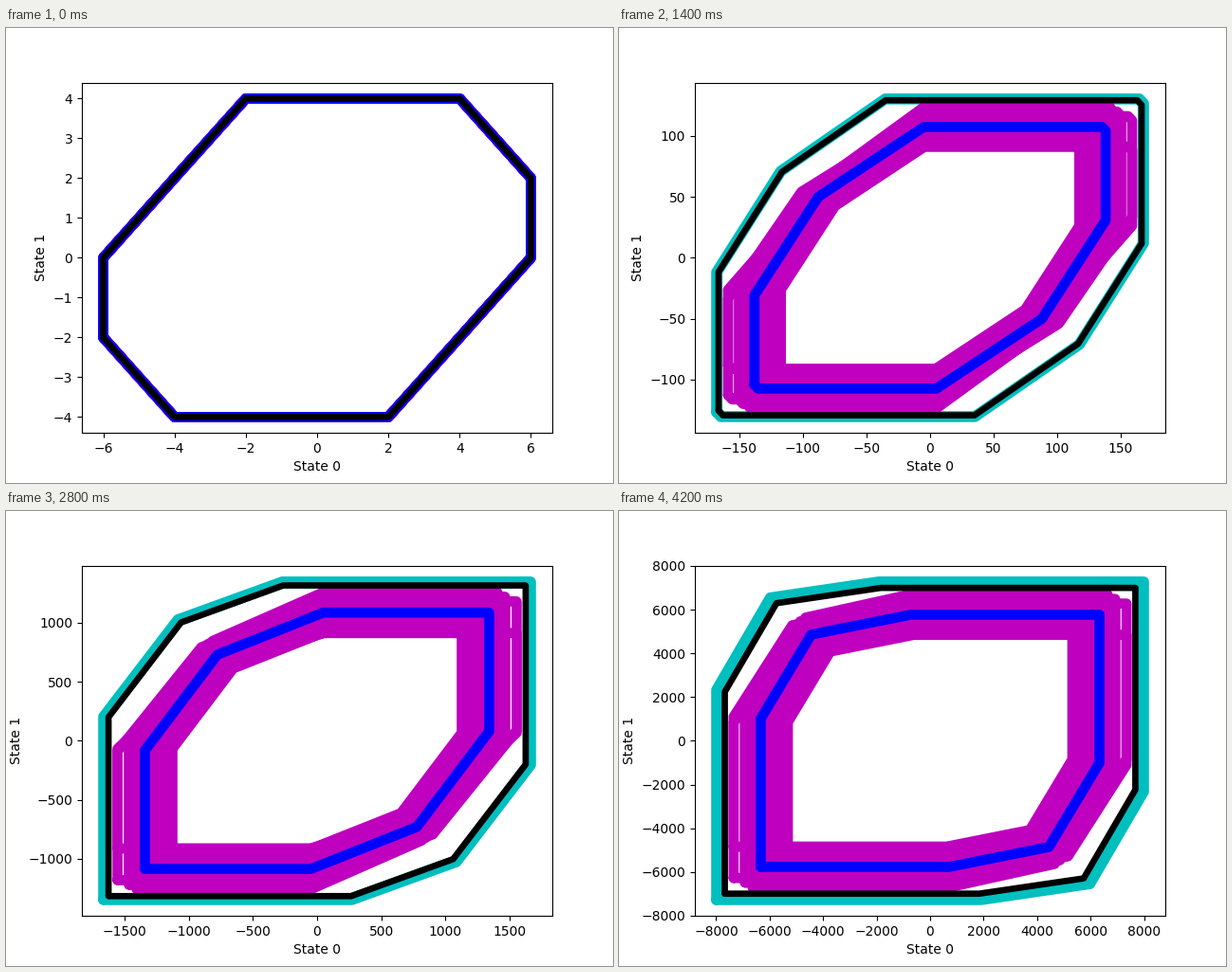
These frames come from a looping animation (640 px wide and 480 px high, 4400 ms). A matplotlib script:

```python
import numpy as np
import matplotlib.pyplot as plt
from matplotlib.animation import FuncAnimation

STEPS = 22
INTERVAL = 200
THICK, THIN = 7.7, 4.8

# Reach of the outermost set along both axes at a few steps
REACH = {0: (6, 4), 3: (20.08, 30.47), 4: (38.4, 51), 7: (168.2, 130.8),
         11: (683, 492.7), 14: (1666, 1350), 18: (4367, 3831), 21: (7998, 7288)}

# Upper left corner cut, as fractions of the reach:
# height on the left edge, shoulder x and y, start of the top edge
CUT = {0: (0, -.667, .5, -.333), 3: (.71, -.85, .88, -.42),
       7: (-.09, -.70, .545, -.21), 11: (-.03, -.586, .61, -.14),
       14: (.152, -.652, .762, -.163), 21: (.32, -.748, .90, -.24)}

# Spread factors (x, y) of the magenta sets around the blue one
SPREADS = [(f, f) for f in np.linspace(-1, .58, 9)]
SPREADS += [(1, -1), (1, .55), (.58, .78), (.3, 1)]


def reach_at(step):
    """Smooth growth: cubic Hermite through the logarithms of the key values."""
    keys = np.array(list(REACH))
    logs = np.log(list(REACH.values()))
    slopes = np.gradient(logs, keys, axis=0)
    i = min(np.searchsorted(keys, step, side="right") - 1, len(keys) - 2)
    gap = keys[i + 1] - keys[i]
    t = (step - keys[i]) / gap
    ease = t * t * (3 - 2 * t)
    bend = gap * t * (1 - t) * ((1 - t) * slopes[i] - t * slopes[i + 1])
    return np.exp(logs[i] + ease * (logs[i + 1] - logs[i]) + bend)


def half_outline(step):
    """Half of the outermost set; the rest follows by point symmetry."""
    left, x, y, top = (np.interp(step, list(CUT), col)
                       for col in zip(*CUT.values()))
    bevel = np.array([1 / 3, 1 / 2]) * np.exp(-step / 2.5)
    return np.array([(-1, bevel[1] - 1), (-1, left), (x, y),
                     (top, 1), (1 - bevel[0], 1)])


def outlines(step):
    """Every half outline of a step, in drawing order."""
    outer = half_outline(step)
    black = outer * (1 - .04 * (step / 21) ** 1.2)

    # The blue set is smaller and its corner cut slides inwards
    u = step / 11
    slide = .155 * (u * np.exp(1 - u)) ** 2
    blue = black * (1 - .175 * (1 - np.exp(-step / 2)))
    blue[1:4] += slide * np.array([(0, -1.25), (.4, -.5), (1.1, 0)])

    spread = .16 * (1 - np.exp(-step / 2.5))
    magenta = [blue * (1 + spread * np.array(f)) for f in SPREADS]
    return [outer, (outer + black) / 2, *magenta, blue, black]


fig, ax = plt.subplots(figsize=(6.4, 4.8), dpi=100)
ax.set_xlabel("State 0")
ax.set_ylabel("State 1")

colors = "cc" + "m" * len(SPREADS) + "bk"
lines = [ax.plot([], [], color=c, lw=THIN if c == "k" else THICK,
                 solid_joinstyle="round", solid_capstyle="round")[0]
         for c in colors]


def draw(step):
    reach = reach_at(step)
    for line, half in zip(lines, outlines(step)):
        loop = np.vstack([half, -half, half[:1]]) * reach
        line.set_data(*loop.T)
    ax.set_xlim(-1.1 * reach[0], 1.1 * reach[0])
    ax.set_ylim(-1.1 * reach[1], 1.1 * reach[1])
    return lines


anim = FuncAnimation(fig, draw, frames=STEPS, interval=INTERVAL,
                     repeat=True, repeat_delay=0)
plt.show()
```
